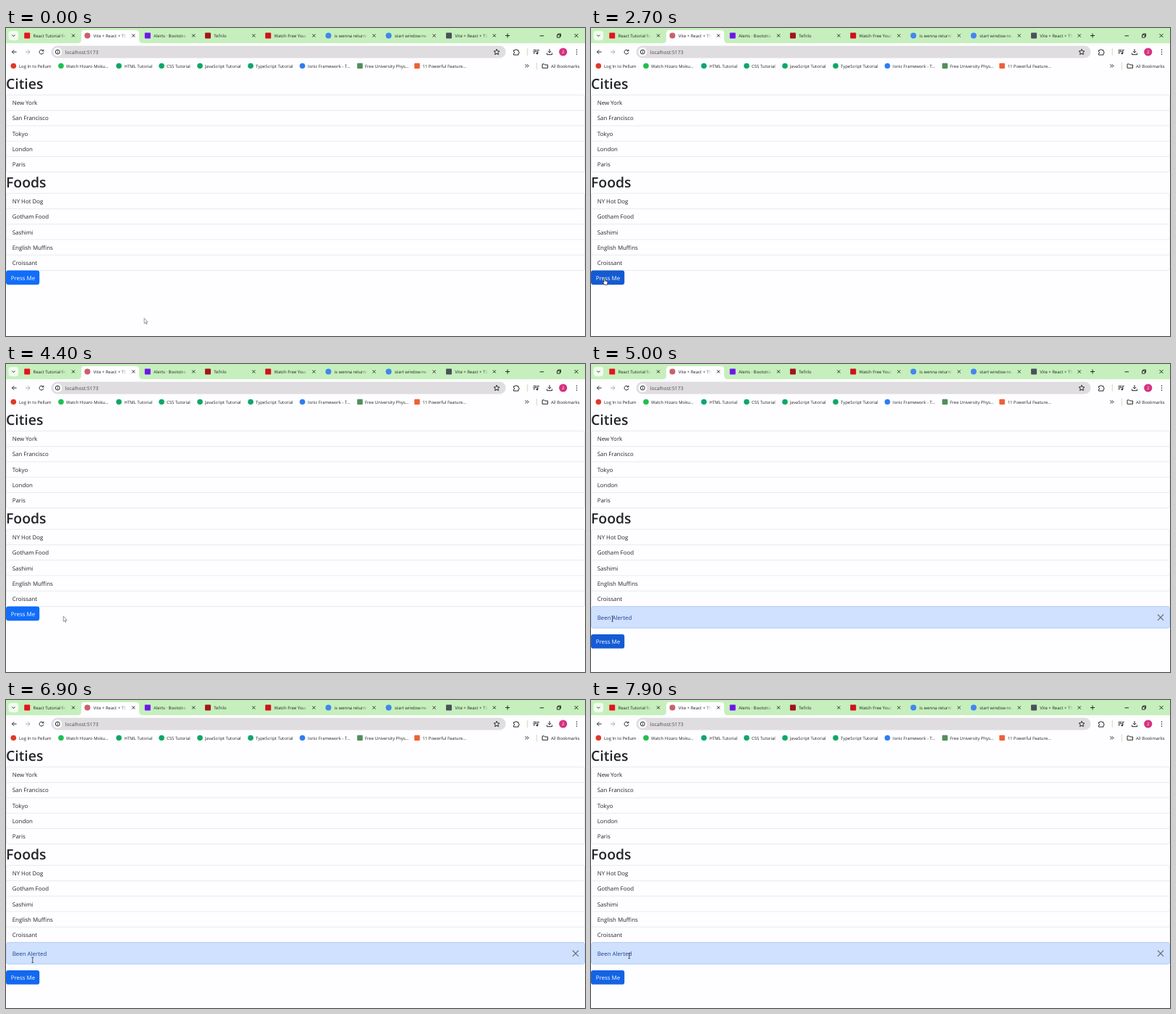
These frames come from a looping animation (800x425 px, 8 s). An HTML page:

```html
<!DOCTYPE html>
<html lang="en">
<head>
<meta charset="utf-8">
<title>Alert toggle</title>
<style>
  html, body { margin: 0; width: 100%; height: 100%; overflow: hidden; background: #fefdff; }
  svg { display: block; width: 800px; height: 425px; }
  text { font-family: "Open Sans", "Noto Sans", sans-serif; text-rendering: geometricPrecision; white-space: pre; }
  .ui { font-size: 5.95px; fill: #222622; }
  .url { font-size: 6.8px; fill: #4a4a4c; }
  .body { font-size: 7.9px; fill: #212529; }
  .h1 { font-size: 19.4px; font-weight: 600; fill: #212529; }
  .line { fill: none; stroke: #262926; stroke-width: 1; }
  .rule { fill: none; stroke: #e5e6ea; stroke-width: .8; }
</style>
</head>
<body>
<svg id="stage" viewBox="0 0 800 425">
  <defs>
    <linearGradient id="fadeGreen">
      <stop offset="0" stop-color="#c6efbd" stop-opacity="0"/>
      <stop offset=".5" stop-color="#c6efbd"/>
    </linearGradient>
    <linearGradient id="fadeWhite">
      <stop offset="0" stop-color="#fefdff" stop-opacity="0"/>
      <stop offset=".5" stop-color="#fefdff"/>
    </linearGradient>
  </defs>
  <rect width="800" height="425" fill="#fefdff"/>

  <!-- tab strip -->
  <rect width="800" height="21" fill="#c6efbd"/>
  <path fill="#fefdff" d="M99 21q5 0 5-5V7.500q0-4.500 4.500-4.500H179.500q4.500 0 4.500 4.500V16q0 5 5 5z"/>
  <rect x="3.500" y="4" width="13.500" height="13" rx="4" fill="#f2fcef"/>
  <path class="line" d="M8.300 9.500l2 2 2-2"/>
  <g id="tabs"></g>
  <path class="line" d="M690 10.500h6M693 7.500v6M737.500 10.800h5.500M785.500 8l5 5M790.500 8l-5 5"/>
  <path class="line" d="M761.500 9.300h3.800v3.800h-3.800zM762.800 9.300V8h3.700v3.700h-1.200"/>

  <!-- toolbar -->
  <path class="line" d="M14.500 33H8.500M11.200 30.200L8.400 33l2.800 2.800"/>
  <path class="line" style="stroke:#aaa" d="M27 33h6M30.300 30.200l2.800 2.800-2.800 2.800"/>
  <path class="line" d="M51.300 31.300a2.900 2.900 0 1 0 .5 2.600M51.900 29.700v2.200h-2.200"/>
  <rect x="62.500" y="24.500" width="628" height="17" rx="8.500" fill="#dfdddf"/>
  <circle cx="71.300" cy="33" r="6" fill="#fefdff"/>
  <circle class="line" cx="71.300" cy="33" r="3"/>
  <path class="line" d="M71.300 32.700v2M71.300 31v.9"/>
  <text class="url" x="81.700" y="35.500">localhost:5173</text>
  <path class="line" d="M678 29.200l1.100 2.500 2.800.3-2.100 1.900.6 2.700-2.400-1.400-2.400 1.400.6-2.700-2.100-1.900 2.800-.3z"/>
  <path class="line" d="M701.500 30.600h2.200a1.100 1.100 0 0 1 2.200 0h2.100v2.200a1.100 1.100 0 0 1 0 2.200v2.100h-6.500v-2.100a1.100 1.100 0 0 0 0-2.200z"/>
  <path stroke="#bfe5b6" d="M720.300 28v10M733.300 47.500v10"/>
  <path class="line" d="M728.500 30.500h5M728.500 32.500h5M728.500 34.500h2.500M734.800 35V30.300h1.900"/>
  <circle cx="733.800" cy="35" r="1.300" fill="#262926"/>
  <path class="line" d="M751 29v5M748.800 32l2.200 2.200 2.200-2.200M747.500 34.500v2.200h7v-2.200"/>
  <circle cx="769.700" cy="33" r="5.600" fill="#d5317f"/>
  <text class="ui" x="769.700" y="35.100" text-anchor="middle" style="fill:#fff">2</text>
  <g fill="#262926"><circle cx="788.500" cy="30" r=".8"/><circle cx="788.500" cy="33" r=".8"/><circle cx="788.500" cy="36" r=".8"/></g>

  <!-- bookmarks -->
  <g id="marks"></g>
  <path class="line" d="M717.500 50.200l2 2.100-2 2.100M720 50.200l2 2.100-2 2.100"/>
  <path class="line" d="M741 49.800h2.700l1 1.100h3.800v4.300H741z"/>
  <text class="ui" x="753" y="54.500">All Bookmarks</text>

  <!-- page -->
  <g id="page"></g>
  <g id="alert">
    <rect x=".4" y="334.600" width="799.200" height="29.800" rx="3" fill="#cfe1fe" stroke="#a9cbfc" stroke-width=".8"/>
    <text class="body" x="8.700" y="352.900" style="fill:#1d418c">Been Alerted</text>
    <rect id="ring" x="774.500" y="335" width="25" height="29" rx="2.500" fill="none" stroke="#9cc3fc" stroke-width="2"/>
    <path id="cross" stroke="#000" stroke-width="1.200" stroke-linecap="round" d="M783.300 346l7.400 7.400M790.700 346l-7.400 7.400"/>
  </g>
  <g id="button">
    <rect id="face" y="334.500" width="46.200" height="19.700" rx="3.100"/>
    <text class="body" x="6.700" y="347.700" style="fill:#fff">Press Me</text>
  </g>

  <g id="cursor" stroke="#222" stroke-width=".7" fill="#fff" stroke-linejoin="round">
    <path id="arrow" stroke="#555" stroke-width=".6" d="M0 0v7.200l1.700-1.500 1.100 2.600 1-.5-1.100-2.500h2.300z"/>
    <path id="hand" d="M-.8.8a.8.8 0 0 1 1.600 0v2.600l2.600.6q1 .3.8 1.400l-.6 3.400H0l-2.400-3.400q-.2-.9.7-.8l.9.8z"/>
    <path id="beam" fill="none" d="M-1.400-3.600h2.800M0-3.600v7.200M-1.400 3.600h2.800"/>
  </g>
</svg>
<script>
const el = id => document.getElementById(id);
const text = (cls, x, y, s) => `<text class="${cls}" x="${x}" y="${y}">${s}</text>`;
const dot = (x, y, color, round, r = 4) =>
  `<rect x="${x - r}" y="${y - r}" width="${2 * r}" height="${2 * r}" rx="${round ? r : 1}" fill="${color}"/>`;

// title, icon colour, round icon
const tabs = [
  ["React Tutorial for B", "#e8121c", 0],
  ["Vite + React + TS", "#c8606c", 1],
  ["Alerts · Bootstrap v", "#6f14ee", 0],
  ["Tefrilo", "#a3141c", 0],
  ["Watch Free Yours", "#d0111b", 0],
  ["is wenna returning", "#4285f4", 1],
  ["start window reco", "#4285f4", 1],
  ["Vite + React + TS", "#48525c", 0]
];
el("tabs").innerHTML = tabs.map(([title, color, round], i) => {
  const x = 83.25 * i, c = 93 + 83.1 * i;
  return dot(29.2 + x, 10.5, color, round) + text("ui", 37.5 + x, 12.7, title) +
    `<rect x="${76 + x}" y="5" width="14" height="12" fill="url(#${i == 1 ? "fadeWhite" : "fadeGreen"})"/>` +
    `<path class="line" d="M${c - 2} 8.500l4 4M${c + 2} 8.500l-4 4"/>`;
}).join("");

// icon x, label x, label, icon colour, round icon
const marks = [
  [10.3, 18, "Log In to Pellum", "#e0392b", 1],
  [76, 83, "Watch Hizaro Moku...", "#1fbf52", 1],
  [156, 163.5, "HTML Tutorial", "#0aa868", 1],
  [215, 222, "CSS Tutorial", "#0aa868", 1],
  [268, 275, "JavaScript Tutorial", "#0aa868", 1],
  [338, 345, "TypeScript Tutorial", "#0aa868", 1],
  [409.5, 417, "Ionic Framework - T...", "#2f7cf0", 1],
  [489, 496, "Free University Phys...", "#4f8f5a", 0],
  [568, 575.5, "11 Powerful Feature...", "#ee6035", 0]
];
el("marks").innerHTML = marks.map(([ix, x, label, color, round]) =>
  dot(ix, 52.3, color, round, 3.8) + text("ui", x, 54.5, label)).join("");

const ROW = 21.25;
function list(title, top, items) {
  let s = text("h1", 0, top - 8.6, title) +
    `<rect class="rule" x=".4" y="${top}" width="799.200" height="${ROW * 5}" rx="3"/>`;
  items.forEach((item, i) => {
    const y = top + ROW * i;
    if (i) s += `<path class="rule" d="M0 ${y}H800"/>`;
    s += text("body", 8.7, y + 13.8, item);
  });
  return s;
}
el("page").innerHTML =
  list("Cities", 92.4, ["New York", "San Francisco", "Tokyo", "London", "Paris"]) +
  list("Foods", 228.2, ["NY Hot Dog", "Gotham Food", "Sashimi", "English Muffins", "Croissant"]);

// pointer path: time, x, y
const path = [
  [0, 191, 400.5], [700, 191, 400.5], [1200, 90, 374], [1600, 24, 351], [2500, 18.8, 345.5],
  [2850, 18.8, 345.5], [3450, 786, 349], [3700, 788.5, 349.5], [3850, 788, 350], [4500, 31, 348],
  [4900, 29.5, 351], [5000, 29.5, 351.5], [5400, 34, 382], [5550, 34, 382], [5800, 37, 350],
  [5900, 37, 352], [6000, 37.7, 357.5], [6300, 38, 380], [6430, 38, 380], [6700, 37, 349],
  [6800, 37, 351], [7100, 36, 381], [7200, 35.5, 378], [7300, 35.3, 373.4], [7600, 40, 349],
  [7840, 45, 350], [7900, 52.8, 353]
];
const toggles = [2800, 3750, 5000, 5500, 5900, 6400, 6800, 7200, 7840];
const SHIFT = 38.4;

function pointer(t) {
  const i = path.findIndex(p => p[0] > t);
  if (i < 0) return path[path.length - 1].slice(1);
  const [t0, x0, y0] = path[i - 1], [t1, x1, y1] = path[i];
  const u = (t - t0) / (t1 - t0), k = u * u * (3 - 2 * u);
  return [x0 + (x1 - x0) * k, y0 + (y1 - y0) * k];
}
const isOpen = t => toggles.filter(c => c <= t).length % 2 == 1;
const inside = ([x, y], l, t, r, b) => x >= l && x <= r && y >= t && y <= b;
function onButton(t) {
  const top = 334.5 + (isOpen(t) ? SHIFT : 0);
  return inside(pointer(t), 0, top, 46.2, top + 19.7);
}
// hover colour eases over 150 ms
function hoverMix(t) {
  let n = 0;
  for (let k = 0; k < 15; k++) n += onButton(Math.max(0, t - k * 10));
  return n / 15;
}
const show = (id, on) => el(id).setAttribute("visibility", on ? "visible" : "hidden");

function draw(now) {
  const t = Math.floor(now % 8000 / 100) * 100;
  const pos = pointer(t), open = isOpen(t), m = hoverMix(t);
  const onClose = open && inside(pos, 774, 334, 800, 364.5);
  const focus = open && t >= 3600 && t < 3750;
  const hand = onButton(t) || onClose;
  const beam = !hand && open && inside(pos, 8, 341, 57, 360);

  show("alert", open);
  show("ring", focus);
  show("cross", open);
  el("cross").setAttribute("opacity", focus ? 1 : onClose ? .75 : .5);
  el("button").setAttribute("transform", `translate(0 ${open ? SHIFT : 0})`);
  el("face").setAttribute("fill", `rgb(${17 + 3 * m},${109 - 19 * m},${250 - 40 * m})`);
  el("cursor").setAttribute("transform", `translate(${pos})`);
  show("hand", hand);
  show("beam", beam);
  show("arrow", !hand && !beam);
}
function tick() {
  draw(performance.now());
  requestAnimationFrame(tick);
}
tick();
</script>
</body>
</html>
```
